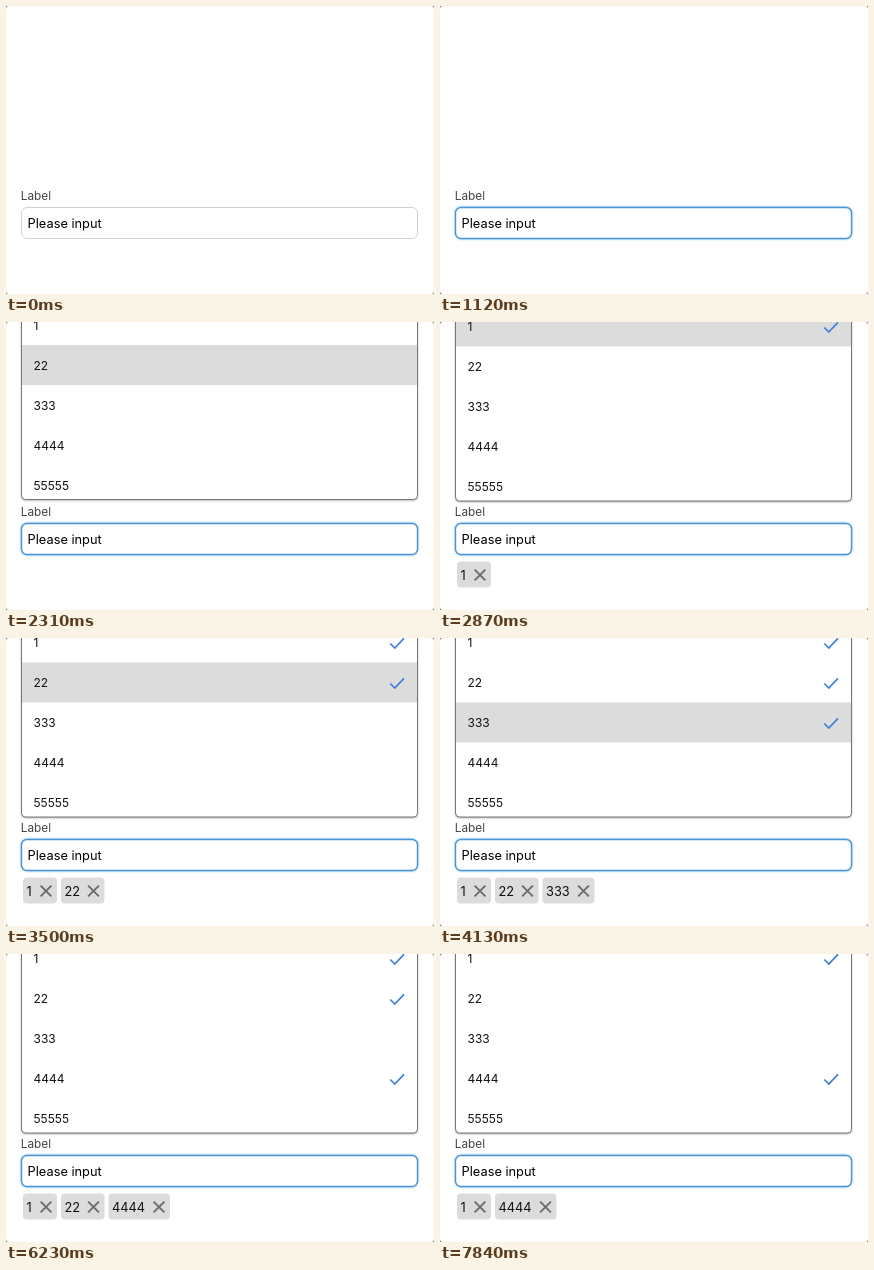
Write an HTML page that moves like this. It is 428 px wide and 288 px high and loops after 8 s.

```html
<!DOCTYPE html>
<html lang="en">
<head>
<meta charset="utf-8">
<title>Multi-select</title>
<style>
  html, body { margin: 0; width: 100%; height: 100%; overflow: hidden; background: #777; }
  svg { display: block; width: 428px; height: 288px; background: #fff; border-radius: 3px; }
  text { font: 12px Inter, sans-serif; fill: #111; }
  .label { font-size: 11.8px; fill: #444; }
  .value, .tag text { font-size: 12.8px; }
  .value { fill: #000; }
  .field { fill: #fff; stroke: #d2d2d2; }
  .focused { stroke: #4b93d2; stroke-width: 1.4; filter: drop-shadow(0 0 1px #7cc4f4); }
  .panel { fill: #fff; filter: drop-shadow(0 1px 1px rgba(0, 0, 0, .35)); }
  .outline { fill: none; stroke: #777; }
  .active, .tag rect { fill: #dcdcdc; }
  .check { fill: none; stroke: #3f7fd6; stroke-width: 1.7; }
  .cross { fill: none; stroke: #6c6c6c; stroke-width: 1.9; }
</style>
</head>
<body>
<svg viewBox="0 0 428 288"></svg>
<script>
const LOOP = 8000;
const ROW = 40;
const options = ['1', '22', '333', '4444', '55555'];
const tagWidths = [34, 43.5, 52, 61.5];

// Each step overrides part of the state from its time on.
const steps = [
  [0, { focused: false, open: false, active: -1, selected: [], clear: false }],
  [1120, { focused: true }],
  [1540, { open: true }],
  [2030, { active: 4 }],
  [2100, { active: 2 }],
  [2310, { active: 1 }],
  [2450, { active: 0 }],
  [2870, { selected: [0] }],
  [3080, { active: 1 }],
  [3500, { selected: [0, 1] }],
  [3710, { active: 2 }],
  [4130, { selected: [0, 1, 2] }],
  [4480, { active: 3 }],
  [4830, { selected: [0, 1, 2, 3] }],
  [5040, { active: 4 }],
  [5110, { active: -1, clear: true }],
  [5250, { clear: false }],
  [6230, { selected: [0, 1, 3] }],
  [7280, { selected: [0, 3] }],
  [7700, { clear: true }],
  [7840, { clear: false }],
];

const text = (x, y, content, cls = '') =>
  `<text class="${cls}" x="${x}" y="${y}">${content}</text>`;

const cross = (x, y, r) =>
  `<path class="cross" d="M${x - r} ${y - r}L${x + r} ${y + r}M${x + r} ${y - r}L${x - r} ${y + r}"/>`;

function drawField({ focused, clear }) {
  return text(14.8, 194.4, 'Label', 'label') +
    `<rect class="field ${focused ? 'focused' : ''}" x="15.5" y="201.5" width="396" height="31" rx="5.5"/>` +
    text(21.6, 221.8, 'Please input', 'value') +
    (clear ? cross(399, 218, 7) : '');
}

function drawList({ active, selected }) {
  const shift = selected.length ? 1.5 : 0;
  const bottom = 177.5 + shift;
  const frame = cls =>
    `<rect class="${cls}" x="15.5" y="-20" width="396" height="${bottom + 20}" rx="4"/>`;
  const top = active * ROW - 17 + shift;
  const highlight = active < 0 ? '' :
    `<rect class="active" x="16" y="${top}" width="395" height="${Math.min(ROW, bottom - top)}"/>`;
  const rows = options.map((name, i) => {
    const y = 3 + i * ROW + shift;
    const check = selected.includes(i)
      ? `<path class="check" d="M384.3 ${y + 1}l4.5 4.6L398 ${y - 4.2}"/>` : '';
    return text(27.5, y + 4.5, name) + check;
  }).join('');
  return frame('panel') + highlight + rows + frame('outline');
}

function drawTags({ selected }) {
  let x = 17;
  return selected.map(i => {
    const left = x, width = tagWidths[i];
    x += width + 4;
    return `<g class="tag"><rect x="${left}" y="239.5" width="${width}" height="26" rx="4"/>` +
      text(left + 3.5, 257.5, options[i]) + cross(left + width - 11, 253, 5.4) + '</g>';
  }).join('');
}

const svg = document.querySelector('svg');
let shown = -1;

function render() {
  const time = performance.now() % LOOP;
  const past = steps.filter(([start]) => start <= time);
  if (past.length !== shown) {
    shown = past.length;
    const state = Object.assign({}, ...past.map(([, change]) => change));
    svg.innerHTML = drawField(state) + (state.open ? drawList(state) : '') + drawTags(state);
  }
  requestAnimationFrame(render);
}
render();
</script>
</body>
</html>
```
